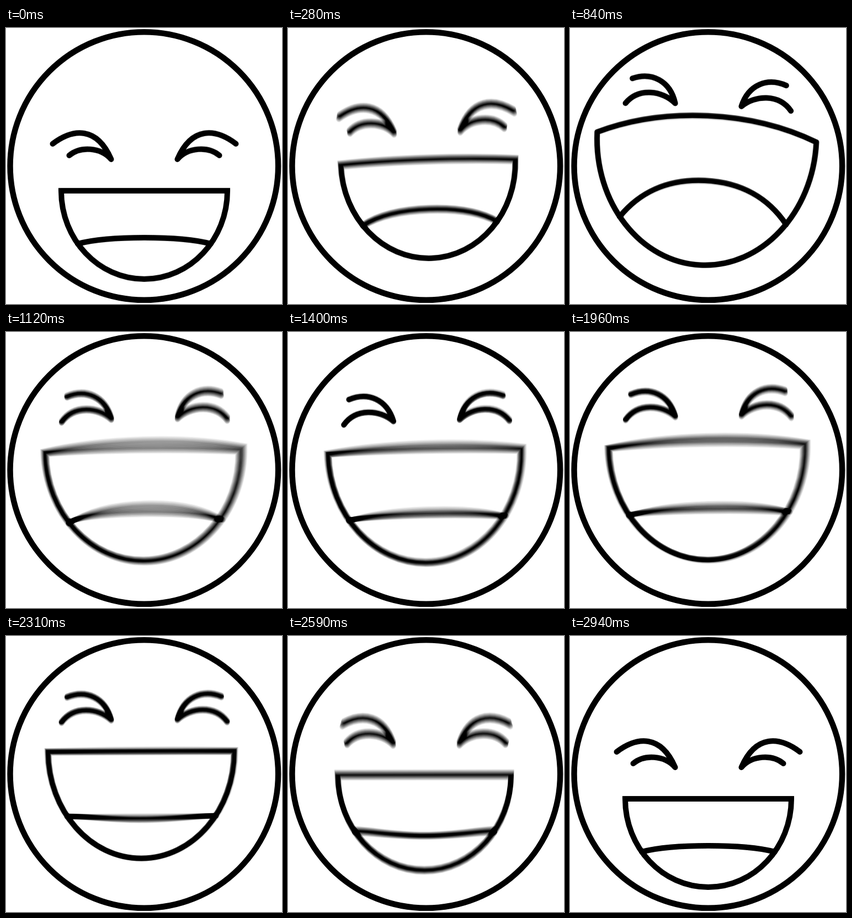
An HTML page with a canvas that plays this animation: 500x500 px, repeating every 3010 ms.

```html
<!DOCTYPE html>
<html lang="en">
<head>
<meta charset="utf-8">
<title>Laughing face</title>
<style>
  html, body { margin: 0; width: 100%; height: 100%; overflow: hidden; background: #fff; }
  canvas { display: block; width: 500px; height: 500px; }
</style>
</head>
<body>
<canvas id="stage" width="500" height="500"></canvas>
<script>
const ctx = document.getElementById('stage').getContext('2d');
const LOOP = 3010, STEP = 70;
const SHUTTER = 58, SAMPLES = 15; // 255 / 15 is whole, so the samples add up to solid black
const MID = 250.5, PIVOT = 140;

// pose: eye height, eye openness, mouth half width, mouth top, top arch,
//       mouth bottom, lip edge, lip middle, mouth shift
const rest = [238, 0, 150.5, 295, 0, 455, 391, 380, 0];
const wide = [139, 1, 199, 197.5, 39, 430, 349, 276, 0];
const low = [162, 1, 170, 222, 0, 409, 340, 337, -5];

// time, tilt, pose
const keys = [
  [0, 0, rest],
  [280, -0.032, [187.5, 0.3, 158, 243, 5, 417, 354, 328, 0]],
  [560, 0, [146, 0.75, 180, 213, 20, 421, 343, 303, 0]],
  [840, 0.047, wide],
  [1050, 0, low],
  [1260, -0.047, wide],
  [1400, -0.028, [160.5, 1, 175, 216.5, 7, 418, 337, 329, -5]],
  [1470, 0, low],
  [1680, 0.047, wide],
  [1890, 0, [159, 1, 170, 215, 2, 411, 335, 331, -5]],
  [1960, -0.021, [151.5, 1, 178, 206.5, 11, 412.5, 328, 319, -4]],
  [2100, -0.047, wide],
  [2310, -0.004, [151.5, 1, 168.5, 209, 0, 402.5, 326, 331, -6]],
  [2940, 0, rest],
  [LOOP, 0, rest]
].map(([t, tilt, pose]) => ({ t, v: [tilt, ...pose] }));

// smooth curve through the keys that rests at every turning point
function slope(i, p) {
  const a = keys[i - 1], b = keys[i], c = keys[i + 1];
  if (!a || !c) return 0;
  const m = (b.v[p] - a.v[p]) / (b.t - a.t);
  const n = (c.v[p] - b.v[p]) / (c.t - b.t);
  return m * n > 0 ? 2 * m * n / (m + n) : 0;
}

function poseAt(time) {
  const t = (time + LOOP) % LOOP;
  const i = keys.findIndex((k, n) => n < keys.length - 1 && t < keys[n + 1].t);
  const a = keys[i], b = keys[i + 1], d = b.t - a.t, u = (t - a.t) / d;
  const h = u * u * (3 - 2 * u);
  return a.v.map((from, p) =>
    from + (b.v[p] - from) * h +
    d * u * (1 - u) * ((1 - u) * slope(i, p) - u * slope(i + 1, p)));
}

// points measured from the inner corner of the eye
const closedEye = [[-106, -28], [-69, -56], [-26, -60], [-19, -22], [-56, -24], [-76, -7]];
const openEye = [[-79.5, -41.5], [-45, -55], [-11, -40.5], [-24, -22], [-67.5, -26], [-90, 4]];

function eye(path, side, y, open) {
  const x = -60 * side;
  const [a, b, c, d, e, f] = closedEye.map(([px, py], i) => [
    x + side * (px + (openEye[i][0] - px) * open),
    y + py + (openEye[i][1] - py) * open
  ]);
  path.moveTo(...a);
  path.bezierCurveTo(...b, ...c, x, y);
  path.bezierCurveTo(...d, ...e, ...f);
}

function drawPose(time) {
  const [tilt, eyeY, open, w, top, arch, bottom, edge, mid, dx] = poseAt(time);
  const k = 0.552, h = bottom - top;

  const mouth = new Path2D();
  const crown = top - arch * 4 / 3;
  mouth.moveTo(dx - w, top);
  mouth.bezierCurveTo(dx - w * 0.4, crown, dx + w * 0.4, crown, dx + w, top);
  mouth.bezierCurveTo(dx + w, top + h * k, dx + w * k, bottom, dx, bottom);
  mouth.bezierCurveTo(dx - w * k, bottom, dx - w, top + h * k, dx - w, top);
  mouth.closePath();

  const lines = new Path2D();
  eye(lines, 1, eyeY, open);
  eye(lines, -1, eyeY, open);
  const lip = w * Math.sqrt(1 - ((edge - top) / h) ** 2);
  const lift = edge - Math.max(0, edge - mid) * 0.62;
  lines.moveTo(dx - lip, edge);
  lines.bezierCurveTo(dx - lip * 0.78, lift, dx - lip * 0.45, mid, dx, mid);
  lines.bezierCurveTo(dx + lip * 0.45, mid, dx + lip * 0.78, lift, dx + lip, edge);

  ctx.save();
  ctx.translate(MID, PIVOT);
  ctx.rotate(tilt);
  ctx.translate(0, -PIVOT);
  ctx.lineWidth = 10;
  ctx.lineCap = 'round';
  ctx.lineJoin = 'round';
  ctx.stroke(lines);
  ctx.lineJoin = arch > 18 ? 'round' : 'miter';
  ctx.stroke(mouth);
  ctx.restore();
}

function draw(time) {
  ctx.globalCompositeOperation = 'source-over';
  ctx.globalAlpha = 1;
  ctx.clearRect(0, 0, 500, 500);
  ctx.strokeStyle = '#000';
  ctx.lineWidth = 10.5;
  ctx.beginPath();
  ctx.arc(250.3, 250, 242.8, 0, Math.PI * 2);
  ctx.stroke();

  // motion blur: add up evenly spaced moments around the time
  ctx.globalCompositeOperation = 'lighter';
  ctx.globalAlpha = 1 / SAMPLES;
  for (let i = 0; i < SAMPLES; i++) {
    drawPose(time + SHUTTER * ((i + 0.5) / SAMPLES - 0.5));
  }
}

const start = performance.now();
let shown = -1;
function tick() {
  const t = (performance.now() - start) % LOOP;
  const step = Math.floor(t / STEP);
  if (step !== shown) {
    shown = step;
    draw(step * STEP);
  }
  requestAnimationFrame(tick);
}
tick();
</script>
</body>
</html>
```
